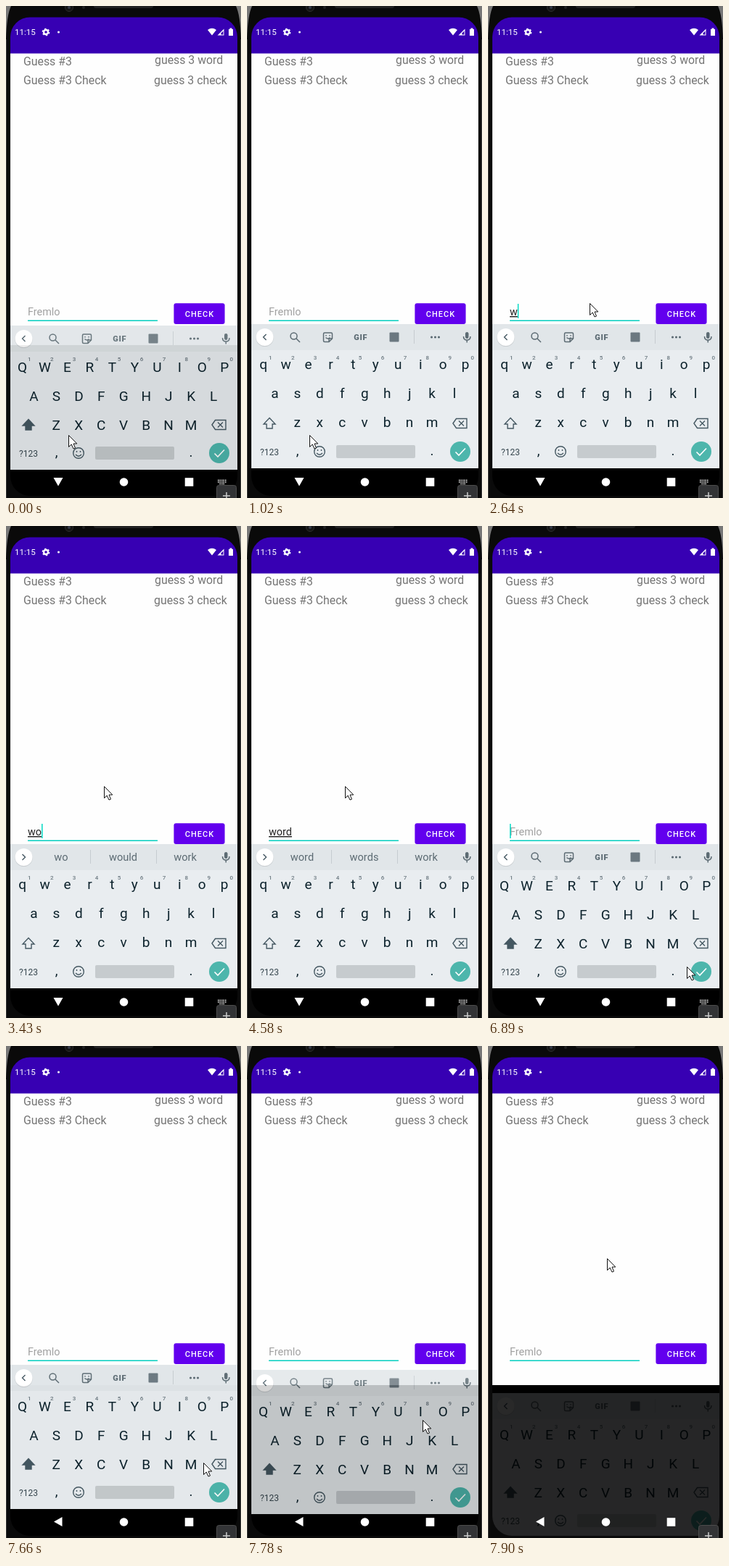
An HTML page for the animation above (8 s loop, 324 by 679 pixels).

```html
<!DOCTYPE html>
<html lang="en">
<meta charset="utf-8">
<title>Word guess</title>
<style>
html, body { margin: 0; height: 100%; overflow: hidden; background: #000; }
svg { display: block; width: 100vw; height: 100vh; font-family: Roboto, sans-serif; }
.label { font-size: 15.85px; fill: #757575; }
.entry { font-size: 14.4px; }
.key { font-size: 19px; fill: #0c222c; text-anchor: middle; }
.digit { font-size: 8px; font-weight: 500; fill: #6d7a82; text-anchor: middle; }
.sug { font-size: 14.6px; fill: #5c6b73; text-anchor: middle; }
.line { fill: none; stroke: #5c6b73; stroke-width: 1.5; }
.dark { fill: none; stroke: #455862; stroke-width: 1.4; }
</style>
<svg viewBox="0 0 324 679">
  <defs>
    <clipPath id="screen"><rect x="6" y="15.5" width="313" height="660.5" rx="27"/></clipPath>
    <clipPath id="buttonClip"><rect x="231.400" y="410.200" width="70.200" height="28.800" rx="3"/></clipPath>
  </defs>

  <!-- phone body -->
  <rect width="324" height="679" fill="#0a0a0a"/>
  <path d="M0 0H7Q1 12 0 46ZM324 0H317Q323 12 324 46Z" fill="#777"/>
  <path d="M.5 679V46M323.500 679V46" stroke="#333"/>
  <circle cx="87" cy="2" r="5.500" fill="#151515" stroke="#2c2c2c"/>
  <circle cx="87" cy="2" r="2" fill="#343a48"/>
  <circle cx="107" cy="2" r="2" fill="#222"/>
  <rect x="121" y="-3" width="82" height="6" rx="3" fill="#222"/>

  <g clip-path="url(#screen)">
    <rect y="15" width="324" height="664"/>
    <rect y="65" width="324" height="403" fill="#fefefe"/>
    <rect y="15" width="324" height="50.500" fill="#3700b3"/>
    <g fill="#fff">
      <text x="12" y="40" font-size="11.600">11:15</text>
      <circle cx="55" cy="36" r="3" fill="none" stroke="#fff" stroke-width="2.400"/>
      <circle cx="55" cy="36" r="4.600" fill="none" stroke="#fff" stroke-width="1.500" stroke-dasharray="2.400"/>
      <circle cx="72.500" cy="36" r="1.500"/>
      <path d="M278 33Q284 28.500 290 33L284 40.500ZM300.500 31.500V40.500H291.500ZM307 32h1.500v-1.500h3V32h1.500v9h-6z"/>
      <path d="M296.500 37.500L299.500 34.500V39.500H296.500Z" fill="#3700b3"/>
    </g>
    <text class="label" x="24" y="82">Guess #3</text>
    <text class="label" x="24" y="108">Guess #3 Check</text>
    <text class="label" x="205" y="79.500">guess 3 word</text>
    <text class="label" x="204" y="107.500">guess 3 check</text>

    <text id="hint" class="entry" x="30" y="427" fill="#a0a0a0">Fremlo</text>
    <text id="typed" class="entry" x="30" y="427" fill="#222" text-decoration="underline"></text>
    <rect id="caret" y="411" width="1.500" height="20" fill="#03dac5"/>
    <rect x="30" y="433.500" width="179" height="1.500" fill="#03cfc0"/>

    <rect x="231.400" y="410.200" width="70.200" height="28.800" rx="3" fill="#6200ee"/>
    <circle id="ripple" cx="271" cy="423" fill="#fff" opacity=".24" clip-path="url(#buttonClip)"/>
    <text x="267" y="429" font-size="11" font-weight="500" letter-spacing="1.050" fill="#fff" text-anchor="middle">CHECK</text>

    <g id="keyboard">
      <rect y="439" width="324" height="199" fill="#e9edf0"/>
      <rect y="439" width="324" height="36" fill="#e1e6e9"/>
      <circle cx="24.500" cy="457.800" r="12.300" fill="#c9ced1"/>
      <circle cx="24.500" cy="457" r="12" fill="#fff"/>
      <path id="chevron" d="M2-4L-2 0L2 4" class="dark"/>

      <g id="tools">
        <circle cx="64.500" cy="455.500" r="4.500" class="line"/>
        <path d="M68 459L73 464" class="line"/>
        <path d="M107 451h9q1.500 0 1.500 1.500V459l-4.500 4.500h-6q-1.500 0-1.500-1.500v-9.500q0-1.500 1.500-1.500zM117.500 459h-4.500v4.500" class="line"/>
        <path d="M109 454v1.500M114 454v1.500M108.500 457.500q3 3 6 0" class="line"/>
        <text x="156.800" y="461" font-size="11" font-weight="900" letter-spacing=".8" fill="#5c6b73" text-anchor="middle">GIF</text>
        <rect x="196.500" y="450.500" width="13" height="13" rx="1" fill="#6b7880"/>
        <path d="M230.500 447v19" stroke="#c6ccd0"/>
        <path d="M254.500 457h.01M259.500 457h.01M264.500 457h.01" stroke="#5c6b73" stroke-width="3.200" stroke-linecap="round"/>
      </g>
      <g id="suggestions">
        <path d="M116.500 447v19M207.500 447v19" stroke="#c6ccd0"/>
        <text class="sug" x="76" y="462"></text>
        <text class="sug" x="161.500" y="462"></text>
        <text class="sug" x="247" y="462"></text>
      </g>
      <rect x="301" y="450" width="4.500" height="9" rx="2.250" fill="#5c6b73"/>
      <path d="M298.500 456q0 5 4.750 5t4.750-5M303.250 461v3.500" class="line"/>

      <g id="keys"></g>
      <path id="shift" d="M31 568.500L39 577H35V583H27V577H23Z" class="dark"/>
      <path d="M284 576L288.500 569.500H303V582.500H288.500ZM292 572.500l7 7M299 572.500l-7 7" class="dark"/>
      <text x="31" y="619.500" font-size="12" fill="#37474f" text-anchor="middle">?123</text>
      <text class="key" x="69.500" y="620">,</text>
      <circle cx="100" cy="615" r="7.300" class="dark"/>
      <path d="M97.500 612v2M102.500 612v2M96 617q4 4.500 8 0" class="dark"/>
      <rect x="123" y="606" width="109" height="18" rx="2" fill="#c6cbce"/>
      <text class="key" x="255" y="620">.</text>
      <circle cx="294" cy="615" r="14" fill="#4db6ac"/>
      <path d="M287.500 615.500l4.500 4.500l9-9.500" fill="none" stroke="#fff" stroke-width="1.600"/>
    </g>

    <!-- navigation bar -->
    <path id="back" d="M-6.500-5.500H6.500L0 6Z" fill="#fff"/>
    <circle cx="162.500" cy="657" r="5.800" fill="#fff"/>
    <rect x="246.700" y="651.200" width="11.600" height="11.600" fill="#fff"/>
    <g id="switcher" stroke="#fff" stroke-width="1.500" stroke-dasharray="1.500 1">
      <path d="M292 654.500h12M292 657h12M294.500 659.500h7"/>
    </g>
  </g>

  <rect x="290.500" y="661.500" width="27" height="24" rx="3" fill="#333436" stroke="#4c4c4c"/>
  <path d="M299 676h10M304 671v10" stroke="#ccc" stroke-width="1.500"/>
  <path id="mouse" d="M.5.5V16.500L4.200 13L7 19L9.500 18L7 12H11.800Z" fill="#fff" stroke="#111"/>
</svg>
<script>
const LOOP = 8000;
const $ = id => document.getElementById(id);
const show = (id, on) => $(id).style.display = on ? '' : 'none';

// Each track holds [start time, value...] steps.
const caretSteps = [[0, 0], [650, 1], [770, 0], [2080, 1], [4580, 0], [4980, 1],
  [5370, 0], [6030, 1], [6510, 0], [6890, 1], [7420, 0]];
const typedSteps = [[0, ''], [2080, 'w'], [3170, 'wo'], [3960, 'wor'], [4210, 'word'], [6030, '']];
const suggestionSteps = [[0, ''], [2770, 'w with was'], [3430, 'wo would work'],
  [3960, 'wor work word'], [4330, 'word words work'], [6150, '']];
const upperSteps = [[0, 1], [1020, 0], [6150, 1]];
const rippleSteps = [[0, 0], [5760, 20], [5880, 50], [6030, 0]];
const slideSteps = [[0, 2, .92], [280, 0, 1], [7660, 1, .98], [7780, 8, .83], [7900, 40, .16]];
const mouseSteps = [[0, 86, 592], [2360, 91, 517], [2500, 136, 494], [2640, 140, 410],
  [2890, 137, 402], [3170, 136, 371], [3310, 135, 359], [5130, 170, 372], [5250, 232, 401],
  [5370, 271, 420], [6270, 266, 400], [6390, 262, 366], [6510, 260, 385], [6630, 262, 450],
  [6750, 268, 545], [6890, 274, 608], [7030, 286, 612], [7170, 289, 614],
  [7540, 286, 606], [7660, 272, 575], [7780, 242, 516], [7900, 164, 293]];
const at = (steps, t) => steps.findLast(s => s[0] <= t).slice(1);

function addText(cls, x, y, text) {
  const el = document.createElementNS('http://www.w3.org/2000/svg', 'text');
  el.setAttribute('class', cls);
  el.setAttribute('x', x);
  el.setAttribute('y', y);
  el.textContent = text;
  $('keys').append(el);
  return el;
}

const letters = [];
['qwertyuiop', 'asdfghjkl', 'zxcvbnm'].forEach((row, r) => {
  [...row].forEach((letter, i) => {
    const x = [22.6, 38.5, 69.3][r] + 30.95 * i, y = 503 + 40 * r;
    letters.push({ letter, y, el: addText('key', x, y, letter) });
    if (!r) addText('digit', x + 9.6, 488, (i + 1) % 10);
  });
});
const words = document.querySelectorAll('.sug');

function draw(now) {
  const t = now % LOOP;
  const [typed] = at(typedSteps, t), [suggestion] = at(suggestionSteps, t);
  const [upper] = at(upperSteps, t), [slide, alpha] = at(slideSteps, t);
  const [mx, my] = at(mouseSteps, t), closing = t >= 7660;

  $('typed').textContent = typed;
  show('hint', !typed);
  show('caret', at(caretSteps, t)[0]);
  $('caret').setAttribute('x', 30 + (typed ? $('typed').getComputedTextLength() : 0));
  $('ripple').setAttribute('r', at(rippleSteps, t)[0]);

  show('tools', !suggestion);
  show('suggestions', suggestion);
  suggestion.split(' ').forEach((word, i) => words[i].textContent = word);
  $('chevron').setAttribute('transform', `translate(24.5 457) scale(${suggestion ? -1 : 1} 1)`);

  for (const { letter, y, el } of letters) {
    el.textContent = upper ? letter.toUpperCase() : letter;
    el.setAttribute('y', upper ? y : y - 2);
  }
  $('shift').style.fill = upper ? '#455862' : 'none';
  $('keyboard').setAttribute('transform', `translate(0 ${slide})`);
  $('keyboard').setAttribute('opacity', alpha);

  $('back').setAttribute('transform', `translate(72 656.5) rotate(${closing ? 90 : 0})`);
  show('switcher', !closing);
  $('mouse').setAttribute('transform', `translate(${mx} ${my})`);
  requestAnimationFrame(() => draw(performance.now() - start));
}
const start = performance.now();
draw(0);
</script>
</html>
```
